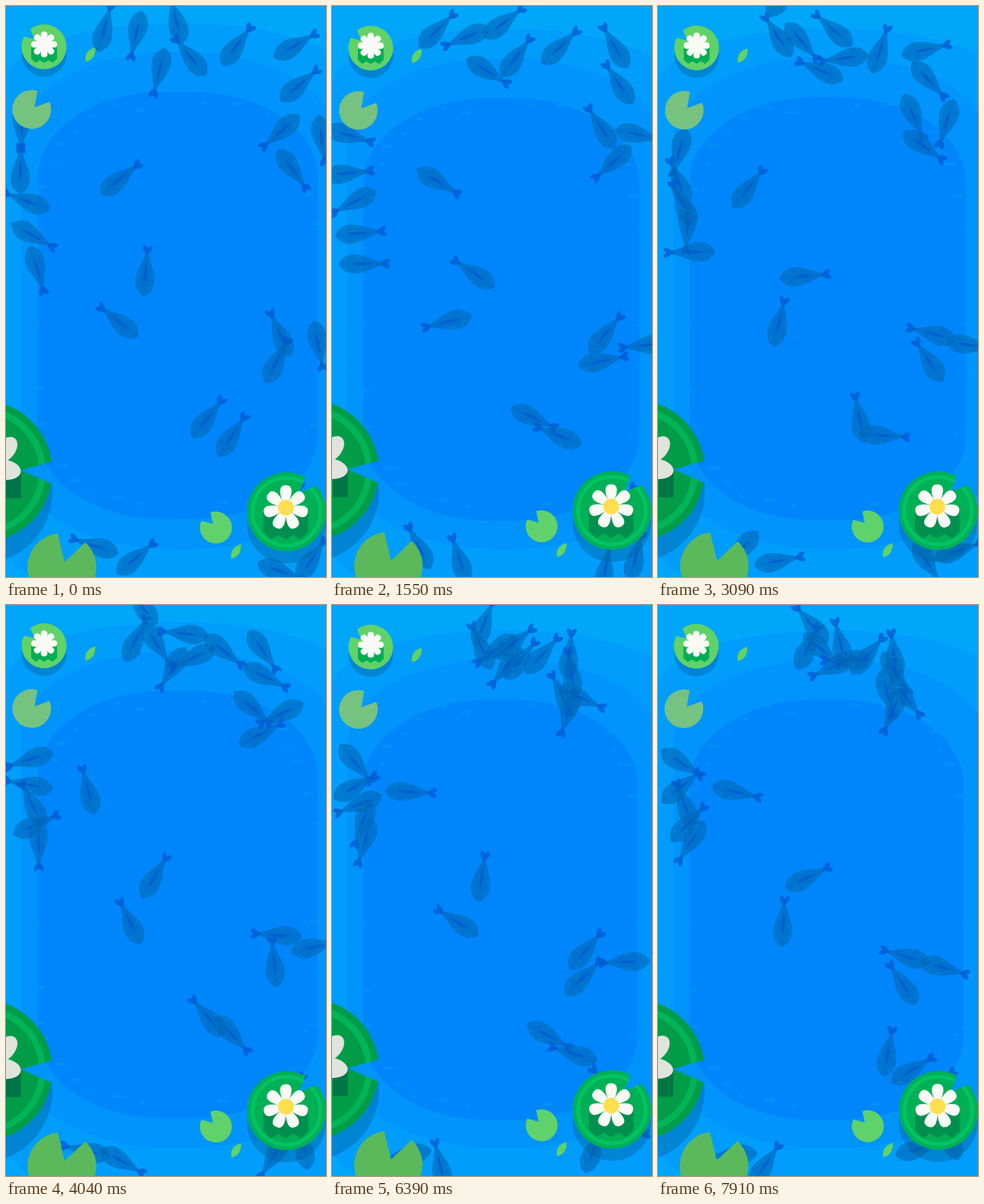
Write an HTML page with a canvas that moves like this. It is 470 px wide and 840 px high and loops after 8 s.

```html
<!DOCTYPE html>
<html lang="en">
<head>
<meta charset="utf-8">
<title>Lily pond</title>
<style>
  html, body { margin: 0; width: 100%; height: 100%; overflow: hidden; background: #0095fb; }
  canvas { display: block; }
</style>
</head>
<body>
<canvas id="pond" width="470" height="840"></canvas>
<script>
const c = document.getElementById('pond').getContext('2d');
const LOOP = 8000, STEPS = 68;
const rad = deg => deg * Math.PI / 180;

let seed = 7;
function random(min, max) {
  seed = (seed * 16807) % 2147483647;
  return min + (max - min) * seed / 2147483647;
}

function ease(t, begin, end) {
  const u = Math.min(1, Math.max(0, (t - begin) / (end - begin)));
  return u * u * (3 - 2 * u);
}

// A shoal starts at [x, y, heading] poses, then drifts by (dx, dy)
// between two times while its spread shrinks to `spread`.
const school = [];
function shoal(begin, end, dx, dy, spread, poses) {
  const mean = k => poses.reduce((sum, pose) => sum + pose[k], 0) / poses.length;
  const midX = mean(0), midY = mean(1);
  for (const [x, y, heading] of poses) {
    school.push({
      x, y, heading, begin, end,
      moveX: dx - (x - midX) * (1 - spread),
      moveY: dy - (y - midY) * (1 - spread),
      swing: random(50, 110) * (random(0, 1) < .5 ? -1 : 1),
      pace: 2 * Math.PI / random(3000, 6000)
    });
  }
}

shoal(0, 7000, -15, -2, .45, [
  [145, 32, 105], [191, 43, -77], [250, 20, 75], [270, 74, 50],
  [225, 97, -76], [339, 58, 127], [425, 58, 150], [431, 116, 140],
  [403, 185, -41], [421, 241, -126], [464, 197, -97], [155, -42, 60]
]);
shoal(0, 5000, -2, 9, .55, [
  [23, 178, -88], [21, 240, 91], [30, 287, 20], [40, 338, -150], [46, 388, -106], [168, 254, 141]
]);
shoal(0, 5000, 17, 6, .9, [[205, 391, 95], [165, 464, 38]]);
shoal(3000, 8000, -39, 35, 1, [[402, 482, 66], [398, 522, 117], [459, 499, -100]]);
shoal(4500, 8000, 42, 52, 1, [[296, 606, 128], [332, 632, 123]]);
shoal(0, 7000, -27, 13, .8, [[130, 794, 18], [191, 812, 140]]);
shoal(0, 7000, -20, -32, 1, [[404, 832, -160], [449, 814, 125], [426, 738, 100]]);

const body = new Path2D('M37 0C33-8 24-15 12-14C-4-13-14-4-29-2V2C-14 4-4 13 12 14C24 15 33 8 37 0Z');
const tail = new Path2D('M-24 0C-28-3-31-8-37-7C-41-6-38-2-35 0C-38 2-41 6-37 7C-31 8-28 3-24 0Z');
const stripe = new Path2D('M19 0C9-3-2-3-14 0C-2 3 9 3 19 0Z');
const marks = new Path2D('M30-8C26-3 21-6 21-13M30 8C26 3 21 6 21 13M11-14C9-8 2-8 2-12M11 14C9 8 2 8 2 12');

function drawFish(f, t) {
  const moved = ease(t, f.begin, f.end);
  c.save();
  c.translate(f.x + f.moveX * moved, f.y + f.moveY * moved);
  c.rotate(rad(f.heading + f.swing * Math.sin(f.pace * t)));
  c.fillStyle = 'rgba(0,102,183,.62)';
  c.fill(body);
  c.fillStyle = 'rgba(0,90,207,.75)';
  c.fill(tail);
  c.fill(stripe);
  c.strokeStyle = 'rgba(0,145,210,.7)';
  c.lineWidth = 1.2;
  c.stroke(marks);
  c.restore();
}

function basin(left, top, right, bottom, rx, ry, color) {
  c.fillStyle = color;
  c.beginPath();
  c.roundRect(left, top, right - left, bottom - top, { x: rx, y: ry });
  c.fill();
}

// Ripples scattered around the rim of the deep water.
const ripples = Array.from({ length: 34 }, (_, i) => {
  const a = 2 * Math.PI * (i + random(-.3, .3)) / 34;
  const bulge = v => Math.sign(v) * Math.abs(v) ** .6;
  return {
    x: 252 + bulge(Math.cos(a)) * random(198, 212),
    y: 442 + bulge(Math.sin(a)) * random(285, 308),
    w: random(6, 18)
  };
});

function drawWater(t, bob) {
  const d = Math.max(.75 * bob, ease(t, 5000, 6400));
  c.fillStyle = '#00a6fa';
  c.fillRect(0, 0, 470, 840);
  basin(-3, 25 + 12 * d, 512, 880, 255, 90, '#009dfc');
  basin(22, 68 + 12 * d, 484, 799, 220, 125, '#0094fc');
  basin(47 - d, 126 + 13 * d, 458 - 9 * d, 755 + 3 * d, 185, 125, '#0086fb');
  c.fillStyle = 'rgba(0,152,252,.5)';
  for (const { x, y, w } of ripples) {
    c.beginPath();
    c.roundRect(x - w / 2, y - 2.5 + 5 * d, w, 5, 2.5);
    c.fill();
  }
}

// A disc with a wedge cut from angle `from` to `to`, meeting at (ax, ay).
function pad(x, y, r, ax, ay, from, to, color, drop = 0, ring) {
  if (drop) {
    // The shadow falls only outside the disc, so the wedge shows water.
    const outside = new Path2D();
    outside.rect(-200, 0, 900, 900);
    outside.arc(x, y, r, 0, 2 * Math.PI);
    c.save();
    c.clip(outside, 'evenodd');
    c.fillStyle = 'rgba(0,95,150,.4)';
    c.beginPath();
    c.arc(x, y + drop, r, 0, 7);
    c.fill();
    c.restore();
  }
  const shape = new Path2D();
  shape.arc(x, y, r, rad(to), rad(from + 360));
  shape.lineTo(ax, ay);
  shape.closePath();
  c.fillStyle = color;
  c.fill(shape);
  if (ring) {
    c.save();
    c.clip(shape);
    c.strokeStyle = ring;
    c.lineWidth = r * .09;
    c.beginPath();
    c.arc(x, y, r * .86, 0, 7);
    c.stroke();
    c.restore();
  }
}

function flower(x, y, r, petals, white, green, heart, heartSize) {
  c.fillStyle = green;
  c.beginPath();
  c.moveTo(x - r, y + r * .2);
  for (let i = 0; i <= 6; i++) {
    const edge = i % 6 === 0;
    c.lineTo(x + r * (i / 3 - 1), y + r * (edge ? 1.1 : i % 2 ? 1.42 : 1.22));
  }
  c.lineTo(x + r, y + r * .2);
  c.fill();
  c.fillStyle = white;
  for (let i = 0; i < petals; i++) {
    c.save();
    c.translate(x, y);
    c.rotate(i * 2 * Math.PI / petals);
    c.beginPath();
    c.moveTo(0, 0);
    c.bezierCurveTo(-r * .25, -r * .45, -r * .42, -r, 0, -r);
    c.bezierCurveTo(r * .42, -r, r * .25, -r * .45, 0, 0);
    c.fill();
    c.restore();
  }
  c.fillStyle = heart;
  c.beginPath();
  c.arc(x, y, r * heartSize, 0, 7);
  c.fill();
}

function petal(x, y, rx, ry, angle) {
  c.beginPath();
  c.ellipse(x, y, rx, ry, rad(angle), 0, 7);
  c.fill();
}

function leaf(x, y) {
  c.fillStyle = '#60d267';
  c.beginPath();
  c.moveTo(x + 7, y - 10);
  c.bezierCurveTo(x + 8, y + 2, x + 2, y + 9, x - 7, y + 11);
  c.bezierCurveTo(x - 9, y, x - 4, y - 7, x + 7, y - 10);
  c.fill();
}

function drawPlants(bob) {
  const scale = 1 - .0055 * bob;
  c.save();
  c.translate(235, 420);
  c.scale(scale, scale);
  c.translate(-235, -420);

  pad(56, 60, 33, 42, 49, 207, 232, '#60d267', 11);
  flower(56, 56.5, 19, 8, '#f9faf5', '#00ad55', '#f9faf5', .6);
  pad(37.7, 152.2, 28.5, 42, 149, -73, -23, '#76c280');
  leaf(124, 71);

  pad(-36.5, 684.5, 104.5, 22, 683, -8, 10, '#009c48', 31, '#00b557');
  c.fillStyle = '#007546';
  c.fillRect(0, 683, 22, 41);
  c.fillStyle = '#e1e3dd';
  petal(-1, 653, 22, 14, -50);
  petal(-4, 682, 26, 15, 8);

  pad(82, 826, 50.5, 86, 818, -97, -47, '#5bb95c');
  pad(308.3, 767.3, 23.5, 304, 762, 205, 250, '#60d26c');
  leaf(338, 802);

  pad(412, 744, 58, 431, 716, -62, -41, '#00b056', 18, '#00c562');
  flower(411, 738, 33, 7, '#f9faf5', '#008f4f', '#ffdf4d', .35);
  c.restore();
}

function frame() {
  const t = Math.floor(performance.now() % LOOP / LOOP * STEPS) * LOOP / STEPS;
  const bob = Math.sqrt(Math.abs(Math.sin(Math.PI * t / 4000)));
  drawWater(t, bob);
  school.forEach(f => drawFish(f, t));
  drawPlants(bob);
  requestAnimationFrame(frame);
}
frame();
</script>
</body>
</html>
```
